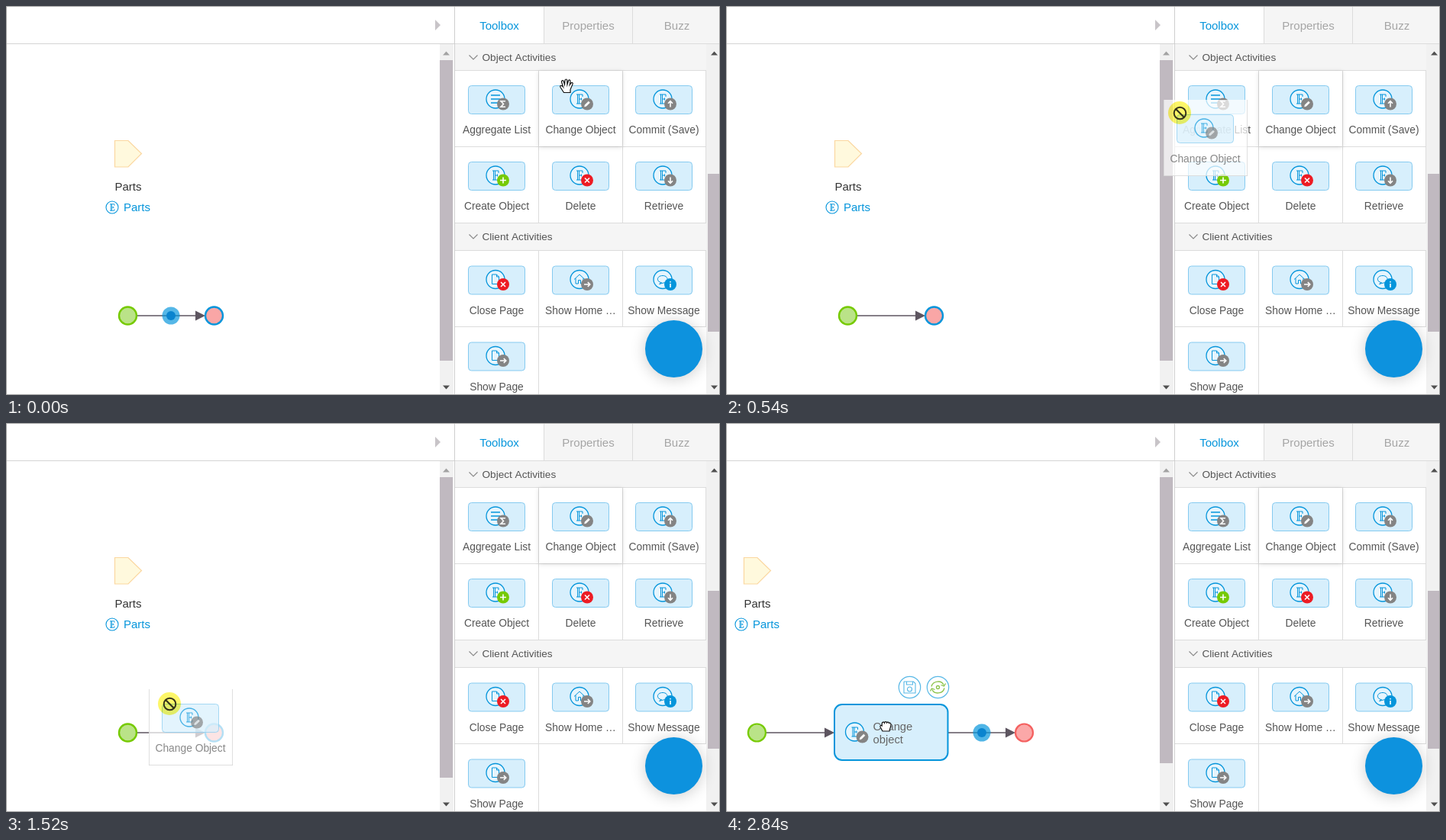
Write an HTML page with a canvas that moves like this. It is 935 px wide and 510 px high and loops after 2960 ms.

```html
<!DOCTYPE html>
<html lang="en">
<head>
<meta charset="utf-8">
<title>Flow editor</title>
<style>
  html, body { margin: 0; width: 100%; height: 100%; overflow: hidden; background: #fff; }
  canvas { display: block; }
</style>
</head>
<body>
<canvas id="stage" width="935" height="510"></canvas>
<script>
const ctx = document.getElementById('stage').getContext('2d');
const LOOP = 2960;
const BLUE = '#0595db', PALE = '#d7effc', GRAY = '#848484', GREEN = '#76ca02', RED = '#ed1c24';
const INK = '#555', LINE = '#dcdcdc', THUMB = '#c0b9c0', FLOW = '#5d5560';
const FONT = '"Liberation Sans", Arial, sans-serif';

// Times at which the picture is refreshed
const TICKS = [0, 100, 220, 340, 440, 540, 660, 780, 880, 990, 1090, 1200, 1320, 1430,
  1540, 1640, 1760, 1860, 1970, 2070, 2310, 2410, 2520, 2630, 2740, 2840];
const DRAG = 220, OVER = 1540, DROP = 2310, BUTTONS = 2520;

// Drag path: time, pointer x, y, card x, y
const PATH = [
  [220, 716, 110, 692, 93], [340, 688, 122, 664, 105], [540, 594, 140, 573, 123],
  [780, 440, 184, 421, 167], [1090, 300, 281, 278, 263], [1200, 248, 317, 225, 294],
  [1320, 225, 345, 199, 325], [1430, 214, 368, 187, 349], [1640, 208, 387, 180, 370],
  [1860, 207, 394, 179, 378]
];

// Label, centre x, centre y, icon, badge, badge colour
const TOOLS = [
  ['Aggregate List', 642.5, 123, 'list', 'sum', GRAY],
  ['Change Object', 752.5, 123, 'entity', 'pen', GRAY],
  ['Commit (Save)', 861.5, 123, 'entity', 'up', GRAY],
  ['Create Object', 642.5, 223, 'entity', 'plus', GREEN],
  ['Delete', 752.5, 223, 'entity', 'cross', RED],
  ['Retrieve', 861.5, 223, 'entity', 'down', GRAY],
  ['Close Page', 642.5, 359.5, 'page', 'cross', RED],
  ['Show Home \u2026', 752.5, 359.5, 'home', 'right', GRAY],
  ['Show Message', 861.5, 359.5, 'bubble', 'info', BLUE],
  ['Show Page', 642.5, 459.5, 'page', 'right', GRAY]
];

function rect(x, y, w, h, color) {
  ctx.fillStyle = color;
  ctx.fillRect(x, y, w, h);
}

function paint(fill, stroke, width = 1) {
  if (fill) { ctx.fillStyle = fill; ctx.fill(); }
  if (stroke) { ctx.strokeStyle = stroke; ctx.lineWidth = width; ctx.stroke(); }
}

function circle(x, y, r, fill, stroke, width) {
  ctx.beginPath();
  ctx.arc(x, y, r, 0, Math.PI * 2);
  paint(fill, stroke, width);
}

function round(x, y, w, h, r, fill, stroke, width) {
  ctx.beginPath();
  ctx.roundRect(x, y, w, h, r);
  paint(fill, stroke, width);
}

function shape(d, fill, stroke, width) {
  const path = new Path2D(d);
  if (fill) { ctx.fillStyle = fill; ctx.fill(path); }
  if (stroke) { ctx.strokeStyle = stroke; ctx.lineWidth = width || 1; ctx.stroke(path); }
}

function text(s, x, y, size, color, align = 'left') {
  ctx.font = `${size}px ${FONT}`;
  ctx.textAlign = align;
  ctx.fillStyle = color;
  ctx.fillText(s, x, y);
}

function at(x, y, draw, scale = 1) {
  ctx.save();
  ctx.translate(x, y);
  ctx.scale(scale, scale);
  draw();
  ctx.restore();
}

const GLYPHS = {
  entity: 'M-4 -6H4V-3M4 6H-4M4 6V3M-2.5 -6V6M-0.5 -6V6M-0.5 0H2.5M2.5 -1.5V1.5',
  list: 'M-6 -5H6M-6 0H6M-6 5H6',
  page: 'M-4.5 -6.5H1.5L4.5 -3.5V6H-4.5ZM1.5 -6.5V-3.5H4.5',
  home: 'M-7 0L0 -6.5L7 0M-5 -1.5V5.5H-1.5V1H1.5V5.5H5V-1.5',
  bubble: 'M-1.5 4.2C-9 3 -8 -5 0 -5C8 -5 8 4.5 1 4.5L-4.5 6Z'
};

const MARKS = {
  pen: 'M-3.5 3.5L-2.8 1L1.8 -3.5L3.5 -1.8L-1 2.8Z',
  up: 'M0 4V-3.5M-3 -0.8L0 -3.8L3 -0.8',
  down: 'M0 -4V3.5M-3 0.8L0 3.8L3 0.8',
  right: 'M-4 0H3.5M0.8 -3L3.8 0L0.8 3',
  plus: 'M-4 0H4M0 -4V4',
  cross: 'M-3 -3L3 3M3 -3L-3 3',
  sum: 'M3 -3.8H-3L0.5 0L-3 3.8H3',
  info: 'M0 -1V4M0 -4V-2.4'
};

function icon(x, y, glyph, mark, color) {
  at(x, y, () => {
    circle(0, 0, 12, '#e6f5fd', BLUE, 1.3);
    shape(GLYPHS[glyph], null, BLUE, glyph === 'list' ? 1.5 : 1);
  });
  at(x + 10, y + 6.5, () => {
    circle(0, 0, 8, color);
    shape(MARKS[mark], mark === 'pen' ? '#fff' : null, '#fff', mark === 'pen' ? 0.5 : 1.6);
  });
}

function tool([label, x, y, glyph, mark, color]) {
  round(x - 37, y - 18.5, 74, 37, 4, PALE, '#85caf0');
  icon(x - 1.5, y - 1, glyph, mark, color);
  text(label, x, y + 44, 13.8, INK, 'center');
}

function arrow(x, y, dir, color) {
  at(x, y, () => shape(`M-4.5 ${-2.5 * dir}H4.5L0 ${2.5 * dir}Z`, color));
}

function section(label, y) {
  rect(588, y, 329, 35, '#f5f5f5');
  at(612, y + 17, () => shape('M-5.5 -2.5L0 3L5.5 -2.5', null, '#888', 1.1));
  text(label, 623.5, y + 22, 13.6, INK);
}

function panel() {
  rect(588, 1, 346, 508, '#fff');
  rect(705, 1, 229, 48, '#f5f5f5');
  rect(704, 1, 1, 49, LINE);
  rect(820, 1, 1, 49, LINE);
  rect(588, 49, 346, 1, LINE);
  text('Toolbox', 646, 30.5, 15, BLUE, 'center');
  text('Properties', 762.5, 30.5, 15, '#a5a5a5', 'center');
  text('Buzz', 878.5, 30.5, 15, '#a5a5a5', 'center');

  section('Object Activities', 50);
  section('Client Activities', 285);
  for (const y of [84, 184, 284, 320, 420]) rect(588, y, 329, 1, LINE);
  for (const x of [697, 807]) {
    rect(x, 84, 1, 200, LINE);
    rect(x, 320, 1, 100, LINE);
  }
  rect(697, 420, 1, 89, LINE);
  rect(916, 84, 1, 200, LINE);
  rect(916, 320, 1, 100, LINE);

  ctx.save();
  ctx.shadowColor = 'rgba(0,0,0,.14)';
  ctx.shadowBlur = 6;
  ctx.shadowOffsetY = 1;
  rect(698, 85, 109, 99, '#fff');
  ctx.restore();
  TOOLS.forEach(tool);

  rect(917, 50, 17, 459, '#f1f1f1');
  rect(919, 220, 15, 207, THUMB);
  arrow(927.5, 62, -1, '#505050');
  arrow(927.5, 500, 1, '#505050');

  ctx.save();
  ctx.shadowColor = 'rgba(0,0,0,.2)';
  ctx.shadowBlur = 20;
  ctx.shadowOffsetY = 2;
  circle(874.5, 449.5, 37.5, '#0d92de');
  ctx.restore();
}

function flow(x1, x2, color = FLOW) {
  rect(x1, 405.25, x2 - x1 - 10, 1.5, color);
  at(x2, 406, () => shape('M0 0L-13 -6.5V6.5Z', color));
}

function pulse(x, level) {
  ctx.globalAlpha = level;
  circle(x, 406, 11.5, BLUE);
  ctx.globalAlpha = 1;
  circle(x, 406, 6, '#0a84cf');
}

function entityParts(x) {
  at(x, 176, () => shape('M.5 .5H18L35.5 17.5L18 35H.5Z', '#fff9dd', '#fbd7a0', 1.2));
  text('Parts', x + 18, 242, 15, '#333', 'center');
  circle(x - 3, 264, 8, null, BLUE, 1.1);
  at(x - 3, 264, () => shape(GLYPHS.entity, null, BLUE, 1.2), 0.72);
  text('Parts', x + 12, 269, 15, BLUE);
}

function diagram(t) {
  const done = t >= DROP;
  entityParts(done ? 23 : 142);
  if (!done) {
    circle(159.5, 406, 11.5, '#bae388', GREEN, 2.4);
    flow(172, 261, t >= OVER ? BLUE : FLOW);
    circle(272.5, 406, 11.5, '#f9a6a6', BLUE, 2.4);
    if (t < DRAG) pulse(216, 0.68);
    return;
  }
  circle(40.5, 406, 11.5, '#bae388', GREEN, 2.2);
  flow(53, 142);
  flow(291, 379);
  circle(390.5, 406, 11.5, '#fba8a8', '#f4605f', 2.2);
  pulse(335, 0.38 + 0.32 * (t - DROP) / (2840 - DROP));
  round(142, 369, 148.5, 73, 10, PALE, BLUE, 2);
  icon(168.5, 405, 'entity', 'pen', GRAY);
  text('Change', 192.5, 403, 14.8, '#666');
  text('object', 192.5, 420, 14.8, '#666');
  if (t >= BUTTONS) buttons();
}

function buttons() {
  for (const x of [240.5, 277.5]) circle(x, 346.5, 14.2, '#fff', '#58b8e6', 1.2);
  at(240.5, 346.5, () => {
    shape('M-7 -7.5H5L7.5 -5V7.5H-7.5V-7ZM-4 -7.5V-3.5H4V-7.5', null, '#58b8e6', 1.1);
    circle(0, 2.5, 3, null, '#58b8e6', 1.1);
  });
  at(277.5, 346.5, () => {
    shape('M-8.5 -1C-6.5 -9 5 -9.5 7.5 -3M8.5 1C6.5 9 -5 9.5 -7.5 3'
      + 'M10 -5L8 -1.5L4 -3M-10 5L-8 1.5L-4 3', null, '#8bc34a', 1.3);
    circle(0, 0, 2, null, '#8bc34a', 1.3);
  });
}

function workspace(t) {
  rect(0, 0, 935, 510, '#fff');
  rect(0, 49, 587, 1, '#d4d4d4');
  at(565, 25, () => shape('M-3 -7L4 0L-3 7Z', '#c8c4c8'));
  diagram(t);
  rect(568, 50, 18, 459, '#f1f1f1');
  rect(568, 71, 17, (t >= DROP ? 446 : 465) - 71, THUMB);
  arrow(576.5, 62, -1, '#a3a3a3');
  arrow(576.5, 500, 1, '#505050');
  rect(587, 1, 1, 508, '#cfcfcf');
}

function border() {
  ctx.strokeStyle = '#a2a2a2';
  ctx.lineWidth = 1;
  ctx.strokeRect(0.5, 0.5, 934, 509);
}

function ghost(x, y) {
  ctx.save();
  ctx.globalAlpha = 0.7;
  rect(x, y, 110, 100, '#fff');
  rect(x, y, 1, 100, '#d2d2d2');
  rect(x + 109, y, 1, 100, '#d2d2d2');
  rect(x, y + 99, 110, 1, '#d2d2d2');
  tool(['Change Object', x + 54.5, y + 38, 'entity', 'pen', GRAY]);
  ctx.restore();
}

function glow(x, y) {
  ctx.save();
  ctx.globalCompositeOperation = 'multiply';
  circle(x, y, 15, '#fdf668');
  ctx.restore();
}

function openHand(x, y) {
  at(x, y, () => shape('M-3.5 8.5L-8 1.5C-9 -1 -6.5 -1.5 -4.5 1L-6.5 -5.5C-6.5 -8 -4 -8 -3.5 -5.5L-2.5 -2'
    + 'L-2 -7.5C-1.5 -9.5 .5 -9.5 .8 -7.5L1 -2L2.5 -7C3.5 -9 5.3 -8 5 -6L4.2 -1.5'
    + 'L6 -4C7.5 -5.5 8.8 -4 8 -2.5L5 4.5V8.5Z', '#fff', '#111', 1.2));
}

function closedHand(x, y) {
  at(x, y, () => shape('M-4 6.5L-7 1C-7.5 -1 -6 -1.5 -4.8 -.5V-3.5C-4.5 -5.8 -2 -6 -1.5 -4.5'
    + 'C-1 -6.5 1.2 -6.3 1.6 -4.6C2.3 -6 4.2 -5.6 4.4 -4C5.8 -4.8 7 -3.8 7 -2.2C7 1 5.5 3 5 6.5Z',
    '#fff', '#111', 1.2));
}

function forbidden(x, y) {
  circle(x, y, 7.8, null, '#35331c', 2);
  at(x, y, () => shape('M-5.5 -5.5L5.5 5.5', null, '#35331c', 2.2));
}

function dropPointer(x, y) {
  at(x, y, () => {
    shape('M.5 .5V15L4 11.8L6.2 17L8.5 16L6.2 11H10.5Z', '#fff', '#222', 1.1);
    ctx.setLineDash([1.5, 1]);
    shape('M2.5 17H13.5V24H2.5Z', '#fff', '#222', 1.2);
    ctx.setLineDash([]);
  });
}

function dragPose(t) {
  const i = PATH.findIndex(p => p[0] > t);
  if (i < 0) return PATH[PATH.length - 1].slice(1);
  const a = PATH[i - 1], b = PATH[i];
  const k = (t - a[0]) / (b[0] - a[0]);
  return a.slice(1).map((v, j) => Math.round(v + (b[j + 1] - v) * k));
}

function pointer(t) {
  if (t >= DROP) return closedHand(209, 397.5);
  if (t < DRAG) {
    if (t >= 100) glow(734, 106);
    return (t >= 100 ? closedHand : openHand)(734, 105);
  }
  const [x, y, cardX, cardY] = dragPose(t);
  ghost(cardX, cardY);
  glow(x, y);
  if (t >= OVER) dropPointer(x, y);
  else forbidden(x + 0.5, y + 0.5);
}

function draw(t) {
  workspace(t);
  panel();
  border();
  pointer(t);
}

function tick() {
  const now = performance.now() % LOOP;
  draw(TICKS.findLast(s => s <= now));
  requestAnimationFrame(tick);
}
tick();
</script>
</body>
</html>
```
